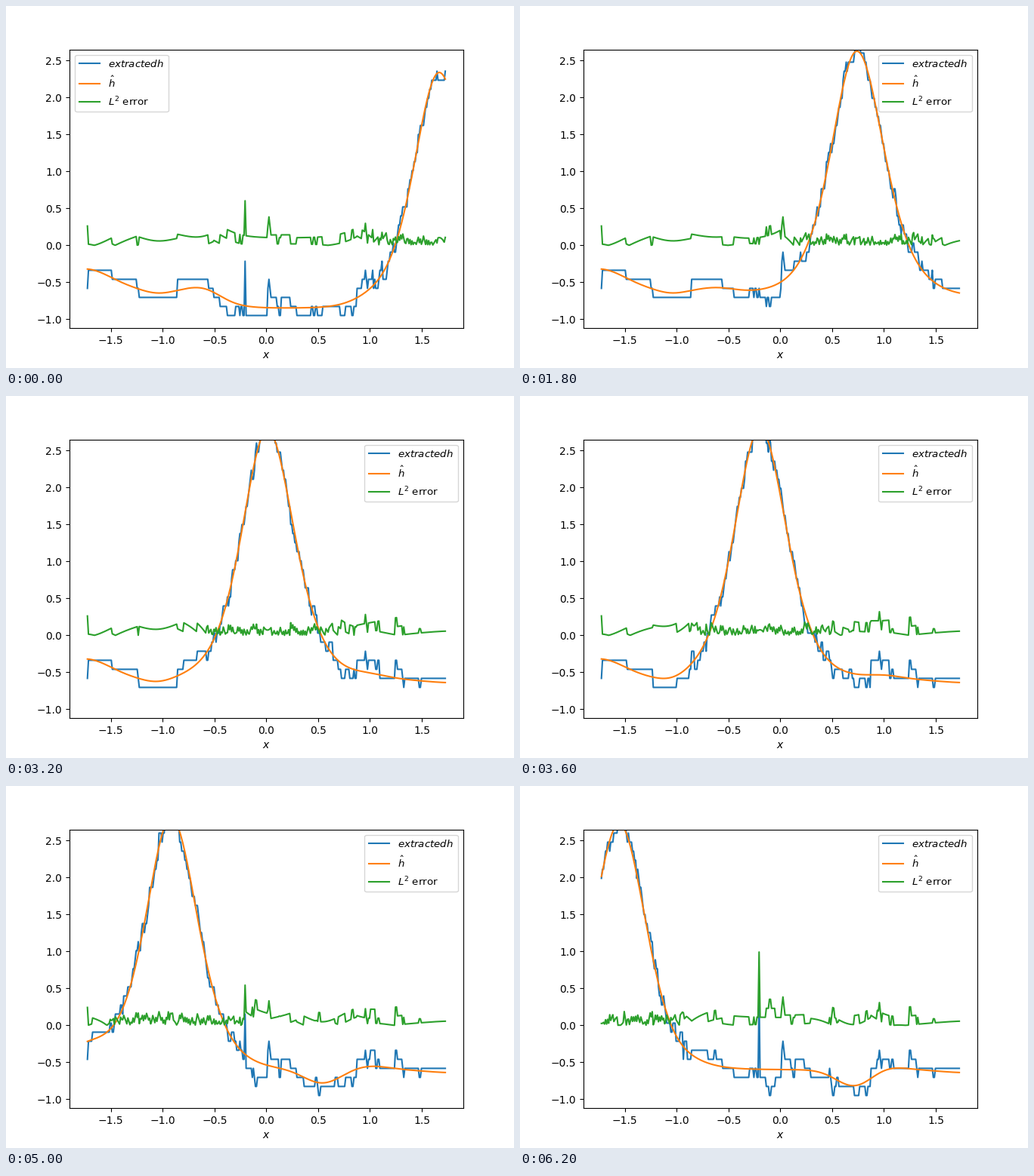
A matplotlib script for the animation above (6400 ms loop, 672x480 px).

```python
import numpy as np
import matplotlib.pyplot as plt
from matplotlib.animation import FuncAnimation

FRAMES, INTERVAL = 32, 200
STEP, FLOOR = 0.1225, -0.95          # quantisation of the extracted curve
PEAK_ZONE = 0.08
X = np.linspace(-1.727, 1.727, 346)

rng = np.random.default_rng(12)


def bell(x, centre, width):
    return np.exp(-((x - centre) / width) ** 2)


def ramp(frame, start, end):
    return np.clip((frame - start) / (end - start), 0, 1)


def random_cells(shortest, longest, amplitude):
    """Piecewise constant noise over X with cells of random width."""
    edges = X[0] + np.cumsum(rng.uniform(shortest, longest, 400))
    values = rng.uniform(-amplitude, amplitude, 401)
    return values[np.searchsorted(edges, X)]


def background(x, frame):
    early = np.exp(-(frame / 7) ** 2)
    late = ramp(frame, 17, 27)
    y = -.6 + .28 * bell(x, -1.75, .35)
    y += .07 * (1 - ramp(frame, 0, 18)) * bell(x, -.6, .22)
    y += .05 * bell(x, 1, .25) - .05 * bell(x, -1.05, .2) - .04 * bell(x, 1.8, .35)
    y -= .25 * early / (1 + np.exp(-(x + .45) / .12))
    y -= .23 * late * bell(x, .45 + .03 * (frame - 22), .25)
    return y


def smooth_curve(frame):
    """A peak that travels left at constant speed over a slow background."""
    centre = 1.67 - .1037 * frame
    top = 2.34 + .48 * np.sin(np.pi * frame / 44)
    u = X - centre
    bump = np.cosh(u / np.where(u < 0, .33, .345)) ** -2
    height = top - background(centre, frame)
    return background(X, frame) + height * bump, bump


# a bias fixed in space: long runs, then finer cells and short blips
RUN_STARTS = np.array([-1.73, -1.45, -1.23, -.86, -.62, -.45, -.14, .01, .29, .71, .87, 1.05])
RUN_BIAS = np.array([.04, .06, -.1, .11, .03, -.09, -.17, .11, -.04, -.12, .17, .03])
BIAS = RUN_BIAS[np.searchsorted(RUN_STARTS, X, side="right") - 1]
BIAS = BIAS + np.where(X > -.65, random_cells(.015, .11, .07), 0)
for i in rng.choice(np.arange(110, 340), 16, replace=False):
    BIAS[i:i + 2] += rng.choice([-STEP, STEP])
JITTER = random_cells(.01, .04, .13)
SPIKE = np.argmin(abs(X + .21))


def curves(frame):
    h, bump = smooth_curve(frame)
    offset = BIAS.copy()
    offset[SPIKE] = .63 * np.exp(-(frame / 5) ** 2) + .95 * ramp(frame, 18, 31)
    offset = np.where(bump > PEAK_ZONE, JITTER, offset)
    offset[0] = -.26 * (1 - bump[0])
    extracted = FLOOR + STEP * np.maximum(np.round((h + offset - FLOOR) / STEP), 0)
    return extracted, h, abs(extracted - h)


fig, ax = plt.subplots(figsize=(6.72, 4.8), dpi=100)
labels = (r"$extracted h$", r"$\hat{h}$", r"$L^2$ error")
lines = [ax.plot([], [], label=label)[0] for label in labels]
ax.set_xlim(-1.9, 1.9)
ax.set_ylim(-1.1215, 2.6515)
ax.set_xlabel("$x$")
legend = ax.legend(loc="upper left", fontsize=9.6, handlelength=2.08,
                   handletextpad=.83, borderpad=.42, labelspacing=.56,
                   borderaxespad=.52)


def update(frame):
    for line, y in zip(lines, curves(frame)):
        line.set_data(X, y)
    legend.set_loc("upper left" if frame < 9 else "upper right")
    return lines


anim = FuncAnimation(fig, update, frames=FRAMES, interval=INTERVAL,
                     repeat=True, repeat_delay=0, blit=False)
plt.show()
```
